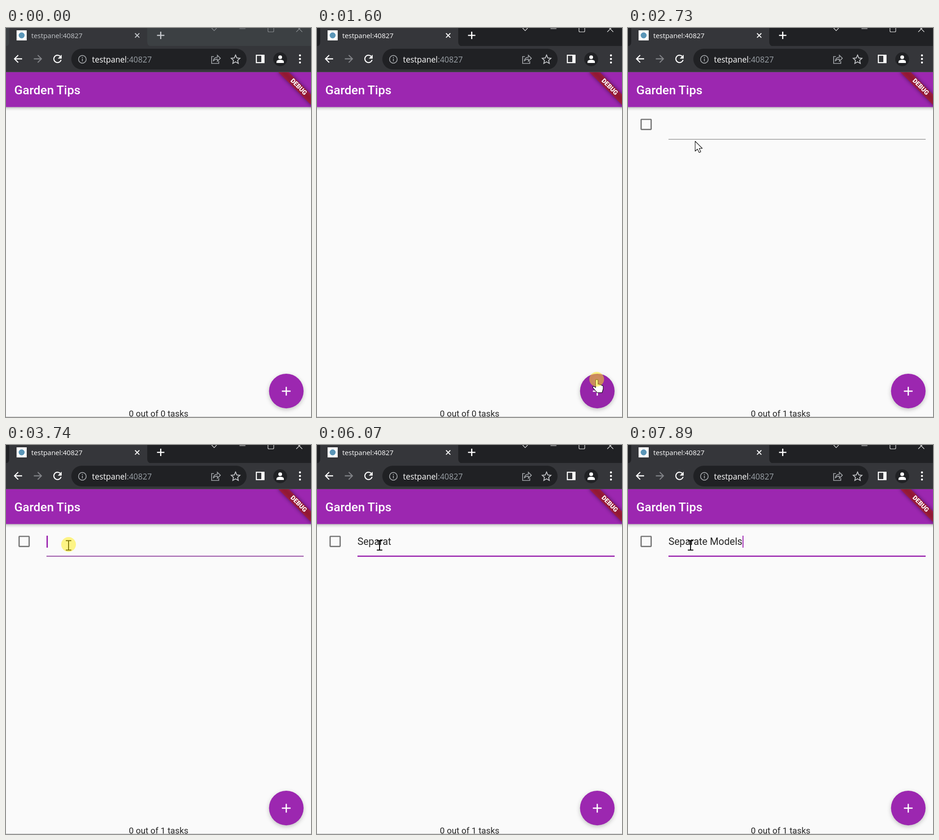
Write an HTML page that moves like this. It is 663 px wide and 845 px high and loops after 8000 ms.

```html
<!DOCTYPE html>
<html lang="en">
<head>
<meta charset="utf-8">
<title>Task list</title>
<style>
  html, body { margin: 0; width: 663px; height: 845px; overflow: hidden; background: #fafafa; }
  #stage { position: relative; width: 663px; height: 845px; overflow: hidden;
    --strip: #3c4043; --tabInk: #c4c7cb; --winInk: #898c90; }
  #stage.active { --strip: #202124; --tabInk: #fff; --winInk: #e8e8e8; }
  svg { position: absolute; inset: 0; display: block; }
  .ui { font-family: "Open Sans", "Noto Sans", sans-serif; }
  .app { font-family: Roboto, sans-serif; }
  .line { fill: none; stroke: #fff; stroke-width: 2.3; }
  .grey { stroke: #a3a6aa; stroke-width: 1.7; }
  .tabInk { stroke: var(--tabInk); stroke-width: 2; }
  .winInk { stroke: var(--winInk); stroke-width: 1.2; }
  .bold { stroke-width: 2.6; }
  #fab { filter: drop-shadow(0 3px 5px rgba(0, 0, 0, .23)); }
  #field { position: absolute; left: 88px; top: 197px; height: 26px; white-space: pre;
    font: 21.45px/25px Roboto, sans-serif; color: #262626; }
  #caret { display: inline-block; vertical-align: top; width: 2.7px; height: 26px; background: #9c27b0; }
  .pointer { stroke: #000; stroke-width: 1.1; fill: #fff; stroke-linejoin: round; }
</style>
</head>
<body>
<div id="stage">
  <svg width="663" height="845" viewBox="0 0 663 845">
    <defs>
      <linearGradient id="fade" x2="0" y2="1">
        <stop offset="0" stop-color="#000" stop-opacity=".28"/>
        <stop offset=".4" stop-color="#000" stop-opacity=".1"/>
        <stop offset="1" stop-color="#000" stop-opacity="0"/>
      </linearGradient>
      <filter id="soft" x="-30%" y="-100%" width="160%" height="300%"><feGaussianBlur stdDeviation="4.5"/></filter>
      <clipPath id="page"><rect y="96" width="663" height="749"/></clipPath>
      <clipPath id="disc"><circle cx="609.3" cy="788.6" r="37.6"/></clipPath>
    </defs>

    <!-- browser frame -->
    <rect width="663" height="40" style="fill:var(--strip)"/>
    <rect y="39" width="663" height="57" fill="#35363a"/>
    <rect y="95" width="663" height="1" fill="#4a4c50"/>
    <path d="M0 39.5Q7 39 7 30V0H307V30Q307 39.5 316 39.5Z" fill="#35363a"/>
    <rect x="23" y="5" width="22" height="22" fill="#fff"/>
    <circle cx="34" cy="16" r="6.5" fill="#5b96b8"/>
    <text class="ui" x="55" y="21.5" font-size="14.9" style="fill:var(--tabInk)">testpanel:40827</text>
    <path class="line tabInk" d="M280.5 11.5l9.4 9.4m0-9.4l-9.4 9.4"/>
    <path class="line tabInk bold" d="M328.3 16h16M336.3 8v16"/>
    <path class="line winInk" d="M447 0l5.5 5.8l5.5-5.8M507.5 1.5h13M569.5-3v9.5q0 2 2 2h8.5q2 0 2-2V-3M631-4.5l13 13m0-13l-13 13"/>

    <path class="line" d="M35 67H18.5M26.5 59l-8 8 8 8"/>
    <path class="line" style="stroke:#808286" d="M60.5 67H77M69 59l8 8-8 8"/>
    <path class="line" d="M117.7 61.4A8 8 0 1 0 119.7 69.3"/>
    <path d="M121 58v8.5h-8.5z" fill="#fff"/>
    <rect x="142" y="45" width="381" height="45" rx="22.5" fill="#202124"/>
    <circle class="line grey" cx="166" cy="68" r="8.3"/>
    <path class="line grey" d="M166 66.8v5.7M166 63v2"/>
    <text class="ui" x="187" y="74.5" font-size="17.4" fill="#fff">testpanel<tspan fill="#9aa0a6">:40827</tspan></text>
    <path class="line grey" d="M452 62h-5v15h15.5v-5M450.5 72q1-8 9-8.500v-4.300l6.500 6.500-6.500 6.500v-4.500q-6 0-9 4.300z"/>
    <path class="line" style="stroke:#c4c6c9;stroke-width:1.8" transform="translate(499 68)"
      d="M0-9.300L2.800-2.900 9.500-2.200 4.500 2.400 6 9 0 5.500-6 9-4.500 2.400-9.500-2.200-2.800-2.900Z"/>
    <rect class="line" x="544.2" y="59.2" width="16.600" height="16"/>
    <rect x="555" y="59" width="7" height="16.500" fill="#fff"/>
    <circle cx="596" cy="68" r="15" fill="#202124"/>
    <circle cx="596" cy="63.500" r="4.100" fill="#fff"/>
    <path d="M588 76v-2.500q0-4.500 8-4.500t8 4.500V76z" fill="#fff"/>
    <g fill="#fff"><circle cx="639" cy="59.500" r="2.200"/><circle cx="639" cy="67.300" r="2.200"/><circle cx="639" cy="75" r="2.200"/></g>

    <!-- page -->
    <g class="app" clip-path="url(#page)">
      <rect y="96" width="663" height="749" fill="#fafafa"/>
      <rect y="171.500" width="663" height="8.500" fill="url(#fade)"/>
      <rect y="96" width="663" height="75.700" fill="#9c27b0"/>
      <text x="18" y="144" font-size="26.700" font-weight="500" fill="#fff">Garden Tips</text>
      <g transform="translate(668 96) rotate(45)">
        <rect x="-53.700" y="37.600" width="107.400" height="16.100" opacity=".5" filter="url(#soft)"/>
        <rect x="-53.700" y="37.600" width="107.400" height="16.100" fill="#b71c1c" fill-opacity=".63"/>
        <text y="49.200" font-size="13.700" font-weight="900" fill="#fff" text-anchor="middle">DEBUG</text>
      </g>
      <g id="task">
        <rect x="28.500" y="198.500" width="21.800" height="21.800" rx=".8" fill="none" stroke="#757575" stroke-width="2.700"/>
        <rect x="88" y="241" width="559" height="1.400" fill="#949494"/>
        <rect id="focus" x="88" y="240.200" width="559" height="2.700" fill="#9c27b0"/>
      </g>
      <text id="count" x="331.700" y="844" font-size="18.800" fill="#262626" text-anchor="middle"></text>
      <rect y="844" width="663" height="1" fill="#c6c6c6"/>
      <circle id="fab" cx="609.300" cy="788.600" r="37.600" fill="#9c27b0"/>
      <g clip-path="url(#disc)">
        <circle id="hover" cx="609.300" cy="788.600" r="37.600"/>
        <circle id="ripple" cx="608" cy="765" fill="#c8c8c8"/>
      </g>
      <path d="M599.700 788.900h19M609.200 779.400v19" stroke="#fff" stroke-width="2.700"/>
    </g>
  </svg>

  <div id="field"><span id="typed"></span><span id="caret"></span></div>

  <svg width="663" height="845" viewBox="0 0 663 845">
    <g id="cursor">
      <path id="arrow" class="pointer" d="M0 0V21.500L5 17L8.600 24.500L12.200 23L8.800 15.500H15.500Z"/>
      <path id="hand" class="pointer" d="M-2.200 1a2.500 2.500 0 0 1 5 0V9q3.600-1.300 4.300 1.200q3.300-1 3.900 1.400q3.300-.6 3.100 3V19L11.800 27H1L-8 17q-1.500-3.500 1.800-3.600L-2.200 16Z"/>
      <path id="beam" d="M-6-10.200H6M0-10.200V10.200M-6 10.200H6" fill="none" stroke="#000" stroke-width="2"/>
    </g>
    <circle id="spot" r="16" fill="#fe1" fill-opacity=".5"/>
  </svg>
</div>

<script>
const LOOP = 8000;
const PHRASE = "Separate Models";
const KEY_TIMES = [4410, 4680, 4880, 5080, 5280, 5480, 5670, 6350, 6550, 6950, 7150, 7220, 7490, 7690, 7890];
const CARET_OFF = [[0, 3710], [4280, 4410], [6070, 6350]];

// rows: time, then values
const PATH = [
  [370, 612, 836], [510, 607, 785], [650, 603, 735], [720, 603, 729],
  [930, 605, 747], [1140, 608, 765], [2322, 608, 765], [2390, 590, 738],
  [2458, 500, 610], [2526, 350, 430], [2594, 222, 315], [2662, 166, 264],
  [2730, 146, 246], [2866, 138, 226], [3002, 136, 218]
];
const HOVER = [[400, 0], [500, 1], [680, 1], [800, 0], [1000, 0], [1200, 1], [2390, 1], [2600, 0]];
const RIPPLE = [[1530, 2, 0], [1700, 22, .1], [1860, 60, 0]];
const FOCUS = [[3610, 0], [3710, .5], [3810, 1]];

const $ = id => document.getElementById(id);
const show = (id, on) => { $(id).style.display = on ? "" : "none"; };
const within = (t, a, b) => t >= a && t < b;

function track(rows, t) {
  const i = rows.findIndex(r => r[0] > t);
  if (i === 0) return rows[0].slice(1);
  if (i < 0) return rows[rows.length - 1].slice(1);
  const a = rows[i - 1], b = rows[i], k = (t - a[0]) / (b[0] - a[0]);
  return a.slice(1).map((v, n) => v + (b[n + 1] - v) * k);
}

function sampled(t) {
  const hold = (from, step) => from + Math.floor((t - from) / step + 1e-6) * step;
  if (within(t, 370, 1200)) return hold(370, 70);
  if (within(t, 1530, 1900)) return hold(1530, 66);
  if (within(t, 2390, 3010)) return hold(2390, 68);
  if (within(t, 3610, 3900)) return hold(3610, 100);
  return within(t, 1900, 2390) ? 1900 : t;
}

function drawCursor(s) {
  const [x, y] = track(PATH, s);
  const onFab = Math.hypot(x - 609.3, y - 788.6) < 37.6;
  const onField = y < 240;
  show("cursor", s >= 370);
  show("hand", onFab);
  show("beam", onField);
  show("arrow", !onFab && !onField);
  $("cursor").setAttribute("transform", `translate(${x} ${y})`);
  show("spot", within(s, 1530, 1780) || within(s, 3610, 3800));
  $("spot").setAttribute("cx", x);
  $("spot").setAttribute("cy", y - 2);
}

function draw() {
  const t = performance.now() % LOOP, s = sampled(t);
  const added = t >= 2060;
  $("stage").classList.toggle("active", t >= 1530);
  drawCursor(s);

  $("hover").setAttribute("opacity", track(HOVER, s)[0] * .04);
  const [r, alpha] = track(RIPPLE, s);
  show("ripple", within(t, 1530, 1860));
  $("ripple").setAttribute("r", r);
  $("ripple").setAttribute("opacity", alpha);

  show("task", added);
  $("count").textContent = `0 out of ${added ? 1 : 0} tasks`;
  $("focus").setAttribute("opacity", track(FOCUS, s)[0]);

  $("typed").textContent = PHRASE.slice(0, KEY_TIMES.filter(k => k <= t).length);
  show("caret", !CARET_OFF.some(([a, b]) => within(t, a, b)));
  requestAnimationFrame(draw);
}
draw();
</script>
</body>
</html>
```
